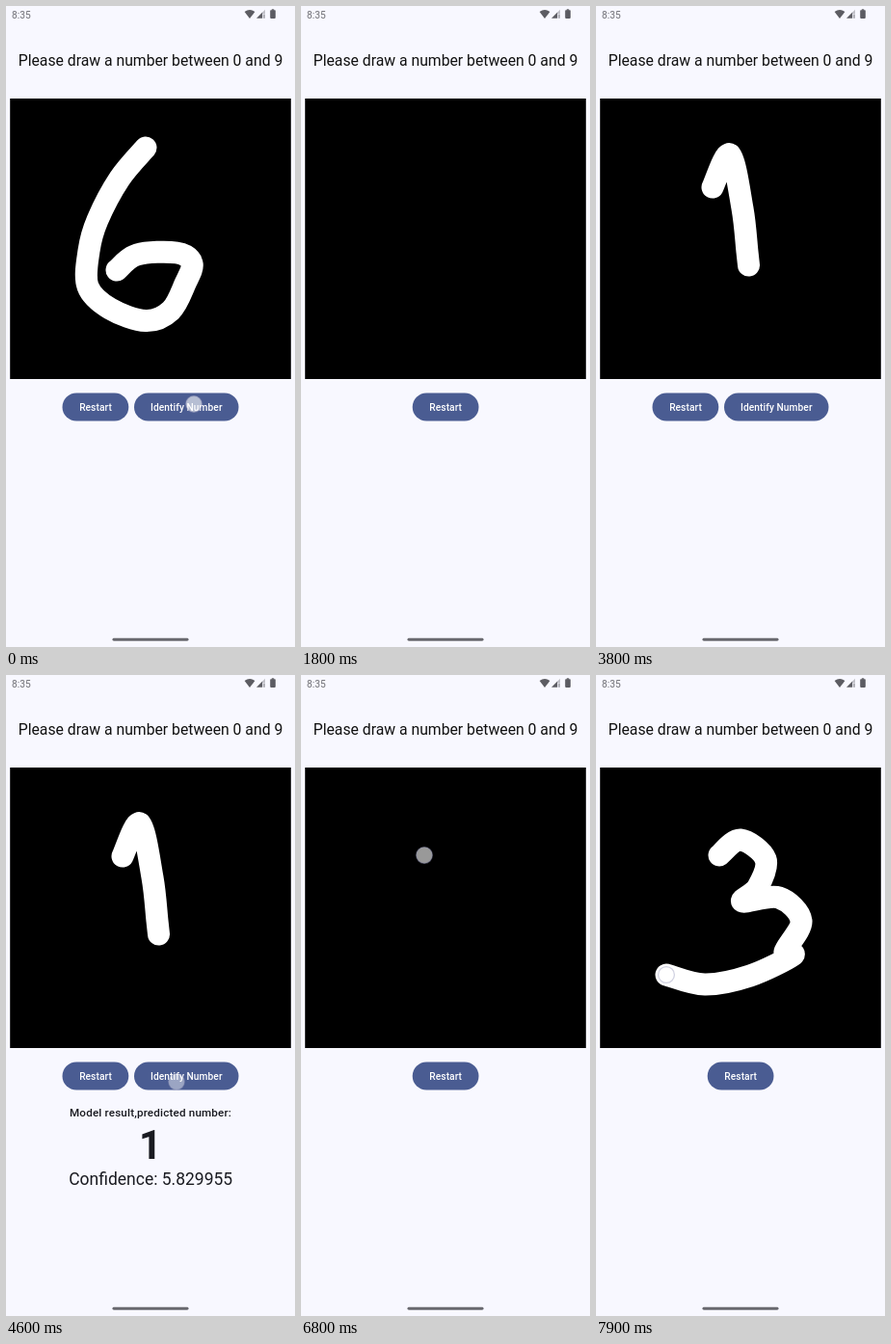
An HTML page that plays this animation: 300 by 665 pixels, repeating every 8000 ms.

```html
<!DOCTYPE html>
<html lang="en">
<head>
<meta charset="utf-8">
<title>Draw a number</title>
<style>
  html, body { margin: 0; width: 100%; height: 100%; overflow: hidden; background: #f8f8ff; }
  svg { display: block; width: 100%; height: 100%; font-family: Roboto, sans-serif; }
  text { text-anchor: middle; fill: #1a1b21; }
  .status { font-size: 10.2px; text-anchor: start; fill: #707076; }
  .title { font-size: 15.75px; fill: #111; }
  .label { font-size: 10.2px; font-weight: 500; letter-spacing: .073px; fill: #fff; }
  .caption { font-size: 11.67px; font-weight: 500; letter-spacing: .17px; }
  .digit { font-size: 41.6px; font-weight: 700; }
  .score { font-size: 17.5px; }
  #stroke { fill: none; stroke: #fff; stroke-width: 23; stroke-linecap: round; stroke-linejoin: round; }
</style>
</head>
<body>
<svg viewBox="0 0 300 665">
  <text class="status" x="6" y="12.6">8:35</text>
  <g fill="#5c5c62">
    <path d="M253 12.9 247.6 6.1Q253 1.7 258.4 6.1Z"/>
    <path d="M260 12.7 266.2 6.5V12.7Z"/>
    <path d="M266.2 6.5 269 3.7V8H266.2Z" opacity=".35"/>
    <path d="M267.4 8.6h1.2v4.1h-1.2z" opacity=".75"/>
    <rect x="274.2" y="4.2" width="5.6" height="8.7" rx=".8"/>
    <rect x="275.8" y="3.3" width="2.4" height="1.5"/>
  </g>
  <text class="title" x="150" y="62">Please draw a number between 0 and 9</text>
  <rect x="4.2" y="96" width="291.6" height="291"/>
  <path id="stroke"/>

  <g id="restart">
    <rect x="58.5" y="401.4" width="68.8" height="29.2" rx="14.6" fill="#4a5c92"/>
    <text class="label" x="93" y="419.6">Restart</text>
  </g>
  <g id="identify">
    <rect x="133" y="401.4" width="108.5" height="29.2" rx="14.6" fill="#4a5c92"/>
    <text class="label" x="187.3" y="419.6">Identify Number</text>
  </g>
  <g id="result">
    <text class="caption" x="150" y="457.7">Model result,predicted number:</text>
    <text class="digit" id="digit" x="150" y="501.8"></text>
    <text class="score" id="score" x="150.2" y="528.6"></text>
  </g>
  <circle id="touch" r="8.4" fill="#fff" fill-opacity=".6" stroke="#8c8fb4" stroke-opacity=".4" stroke-width="1.3"/>
  <rect x="110.5" y="655.8" width="79" height="2.9" rx="1.45" fill="#68686e"/>
</svg>
<script>
const LOOP = 8000, STEP = 100;
const el = id => document.getElementById(id);

// The pen moves from start to end, eased by a power; then the answer comes and all is cleared.
const rounds = [
  { digit: 6, score: "11.038462", start: -800, end: -100, power: 1, answer: 100, clear: 1000, tap: [195, 413],
    shape: [[145, 147], [118, 179], [95, 222], [86, 254], [85, 291], [108, 314], [145, 326.5],
            [171, 316], [186, 288], [193, 267], [177, 256], [136, 258], [115, 274]] },
  { digit: 1, score: "5.829955", start: 2900, end: 3600, power: 2.34, answer: 4600, clear: 5600, tap: [177, 422],
    shape: [[121, 188], [139, 154], [152, 210], [157, 255], [158.5, 269]] },
  { start: 6900, end: 7900, power: 1.3, answer: Infinity, clear: Infinity,
    shape: [[128, 187], [150, 171], [176, 191], [168, 220], [152, 235], [190, 231], [213, 255],
            [196, 287], [204, 291], [160, 312], [113, 321], [73, 311]] }
];
const restartTap = [97, 422];

// Smooth path through the points (Catmull-Rom as cubic curves)
function smooth(points) {
  const at = i => points[Math.max(0, Math.min(points.length - 1, i))];
  const handle = (i, side) => at(i).map((v, k) => v + side * (at(i + 1)[k] - at(i - 1)[k]) / 6);
  let d = "M" + points[0];
  for (let i = 1; i < points.length; i++) d += `C${handle(i - 1, 1)} ${handle(i, -1)} ${points[i]}`;
  return d;
}

const show = (node, on) => node.setAttribute("visibility", on ? "visible" : "hidden");

function placeTouch([x, y], alpha = 1) {
  const c = el("touch");
  c.setAttribute("cx", x);
  c.setAttribute("cy", y);
  c.setAttribute("opacity", alpha);
  show(c, true);
}

// A tap begins just before its effect and fades out after it.
function tap(t, effect, point) {
  const age = t - effect + 100;
  if (age >= 0 && age < 250) placeTouch(point, Math.min(1, (250 - age) / 200));
}

function draw(t) {
  const now = rounds.findIndex(r => t < r.clear), round = rounds[now];
  const { start, end, power, answer, clear } = round;
  const u = Math.max(0, Math.min(1, (t - start) / (end - start))), part = u ** power;
  const ready = t > end, stroke = el("stroke");

  stroke.setAttribute("d", smooth(round.shape));
  const length = stroke.getTotalLength();
  stroke.setAttribute("stroke-dasharray", part < 1 ? `${part * length} 9999` : "none");
  show(stroke, part > 0);

  show(el("identify"), ready);
  el("restart").setAttribute("transform", `translate(${ready ? 0 : 57.2})`);
  show(el("result"), t >= answer);
  el("digit").textContent = round.digit || "";
  el("score").textContent = "Confidence: " + (round.score || "");

  show(el("touch"), false);
  if (t >= start - 100 && t <= end) {
    const p = stroke.getPointAtLength(part * length);
    placeTouch([p.x, p.y]);
  }
  tap(t, answer, round.tap);
  tap(t, clear, restartTap);
  if (now) tap(t, rounds[now - 1].clear, restartTap);
}

function tick() {
  draw(Math.floor(performance.now() % LOOP / STEP) * STEP);
  requestAnimationFrame(tick);
}
tick();
</script>
</body>
</html>
```
